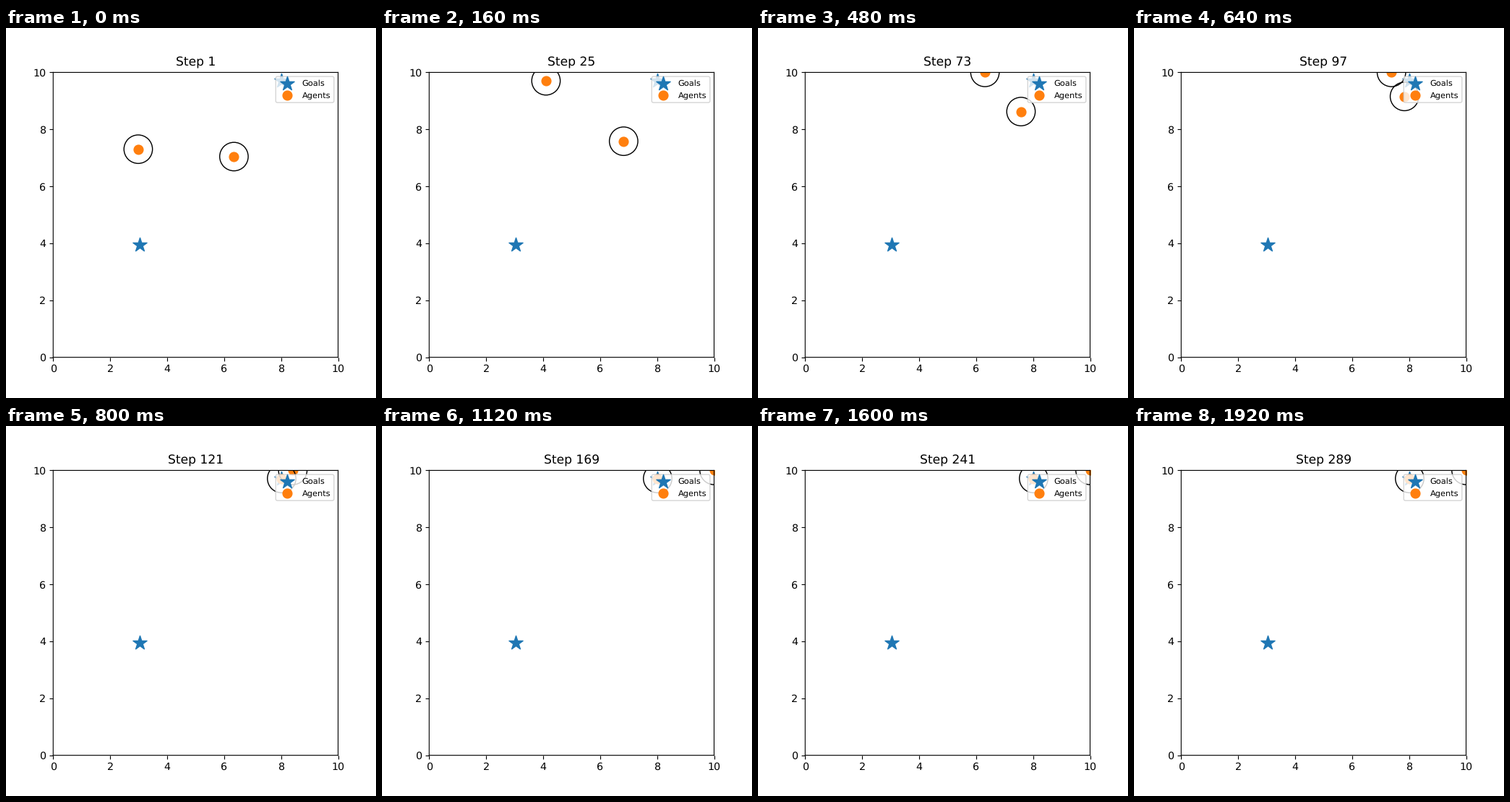
Animation of 512x512 px, one loop 2 s. Source, as a matplotlib script:

```python
import numpy as np
import matplotlib.pyplot as plt
from matplotlib.animation import FuncAnimation

# Soft edges and true glyph metrics instead of pixel snapping
plt.rcParams.update({"path.snap": False, "text.hinting": "no_hinting"})

FRAMES, INTERVAL, STRIDE = 25, 80, 12
SIZE = 10
GOALS = np.array([(3.04, 3.95), (8.02, 9.715)])

# Smooth paths through a few waypoints, time counted in frames
KEYS = [0, 2, 6, 10]
drift_x = np.polyfit(KEYS, [2.985, 4.10, 6.31, 8.41], 3)
seek_x = np.polyfit(KEYS, [6.345, 6.825, 7.575, 8.02], 3)
seek_y = np.polyfit(KEYS, [7.045, 7.585, 8.625, 9.715], 3)


def positions(i):
    """Agent positions, kept inside the arena."""
    t, u = min(i, 14), min(i, 10)
    drifter = np.polyval(drift_x, t), 7.305 + 1.2 * t
    seeker = np.polyval(seek_x, u), np.polyval(seek_y, u)
    return np.clip([drifter, seeker], 0, SIZE)


fig, ax = plt.subplots(figsize=(5, 5), dpi=102.4)
ax.set_xlim(0, SIZE)
ax.set_ylim(0, SIZE)
ax.set_aspect("equal")
ax.set_xticks(range(0, SIZE + 1, 2))
ax.set_yticks(range(0, SIZE + 1, 2))

start = positions(0)
ax.scatter(*GOALS.T, s=200, marker="*", color="C0", label="Goals")
agents = ax.scatter(*start.T, s=80, color="C1", label="Agents")
rings = [ax.add_patch(plt.Circle(p, 0.5, fill=False)) for p in start]
ax.legend(loc="upper right", fontsize=8)
title = ax.set_title("Step 1")


def update(i):
    points = positions(i)
    agents.set_offsets(points)
    for ring, p in zip(rings, points):
        ring.center = tuple(p)
    title.set_text(f"Step {1 + STRIDE * i}")
    return [agents, title, *rings]


anim = FuncAnimation(fig, update, frames=FRAMES, interval=INTERVAL,
                     repeat=True, repeat_delay=0, blit=False)
plt.show()
```
